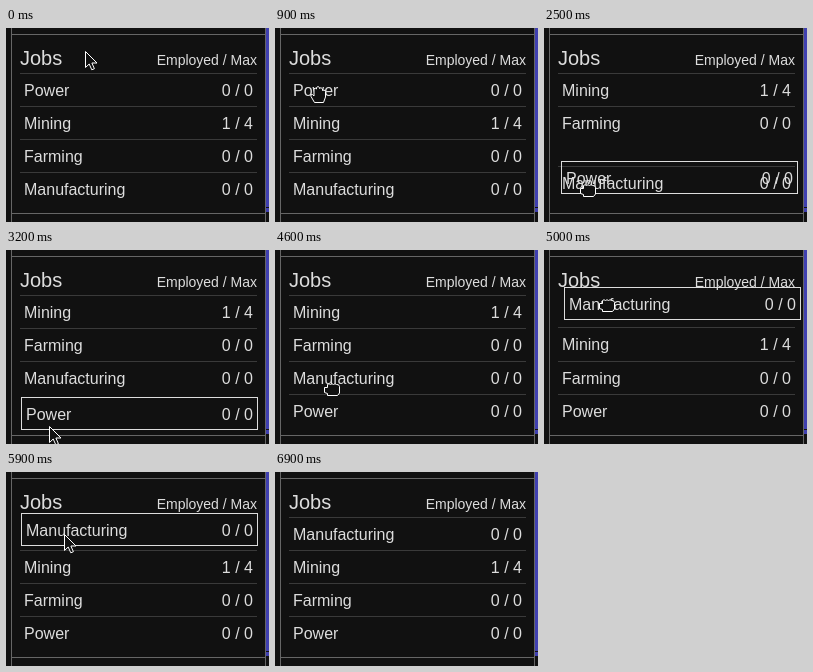
Recreate the animation shown at these times as an HTML page. Size 263 px wide and 194 px high, loop 7.4 s.

```html
<!DOCTYPE html>
<html lang="en">
<head>
<meta charset="utf-8">
<title>Jobs</title>
<style>
  html, body { margin: 0; width: 100%; height: 100%; overflow: hidden; background: #111; }
  body { position: relative; color: #ddd; font: 16px "Liberation Sans", Arial, sans-serif; }
  body > * { position: absolute; box-sizing: border-box; white-space: nowrap; }
  .frame { left: 5px; width: 255px; border: solid #666; border-width: 0 1px; top: 0; height: 194px; }
  .panel { left: 5px; width: 255px; border: solid #666; border-width: 1px 0; top: 6px; height: 180px; }
  .bar { left: 260px; top: 0; width: 3px; height: 184px; background: #4040b0; }
  .bar::after { content: ""; position: absolute; top: 179px; width: 3px; height: 1px; background: #111; }
  .head { left: 14px; top: 14px; width: 237px; height: 31px; }
  .head span { position: absolute; }
  .title { left: 0; top: 4px; font-size: 20px; line-height: 24px; }
  .note { right: 0; top: 10px; font-size: 14px; line-height: 16px; }
  .row {
    left: 0; top: 0; width: 237px; height: 33px; padding: 0 4px;
    display: flex; justify-content: space-between;
    line-height: 34px; border-top: 1px solid #3a3a3a;
  }
  .row.bare { border-top-color: transparent; }
  .row.held { border: 1px solid #ddd; z-index: 1; }
  svg { left: 0; top: 0; width: 24px; height: 28px; overflow: visible; z-index: 2; }
  svg path { fill: #111; stroke: #fff; stroke-width: 1; stroke-linejoin: round; }
</style>
</head>
<body>
<div class="frame"></div>
<div class="panel"></div>
<div class="bar"></div>
<div class="head"><span class="title">Jobs</span><span class="note">Employed / Max</span></div>
<svg id="cursor"><path/></svg>
<script>
const LOOP = 7400, TICK = 100, LEFT = 14, TOP = 45, ROW = 33, SLIDE = 150;
const LAG = 20;     // a held row trails the pointer
const STALE = 400;  // the pointer stays an arrow this long after release

// moves: [time, slot]; drag: start, drop, grip inside the row, final slot
const jobs = [
  { name: "Power", count: "0 / 0", moves: [],
    drag: { from: 1600, drop: 3300, dx: 28, dy: 29, slot: 3 } },
  { name: "Mining", count: "1 / 4", moves: [[1795, 0], [4895, 1]] },
  { name: "Farming", count: "0 / 0", moves: [[2170, 1], [4800, 2]] },
  { name: "Manufacturing", count: "0 / 0", moves: [[2490, 2]],
    drag: { from: 4700, drop: 6000, dx: 43, dy: 21, slot: 0 } }
];

// pointer glides: start, end, target x, target y, ease-out power
const home = [79, 23];
const glides = [
  [300, 900, 43, 66, 1],
  [1500, 2200, 48, 130, 1.2],
  [2200, 2900, 43, 176, 2.3],
  [3500, 3900, 57, 140, 1],
  [4650, 5200, 63.4, 48, 2.4],
  [5400, 5900, 58, 62, 2],
  [6200, 6400, 60, 64, 1],
  [6500, 6900, 47, -30, 1]
];

const shapes = {
  arrow: "M.5 .5V16.5L4.2 13 6.8 18.8 9.4 17.7 6.9 12H12Z",
  open: "M-3.5 8.5L-7 2.5Q-8 0-5.5 .5L-4 2V-5Q-3-7-1.5-5V-6.5Q0-8.5 1.5-6.5V-5.5Q3-7.5 4.5-5V-3.5Q6.5-5 7.5-2.5V3L5.5 8.5Z",
  closed: "M-4.5 5.5V3.5L-7.5 2.5V-2.5H-4.5V-5.5Q-3-7-1.5-5.5Q0-7 1.5-5.5Q3-7 4.5-5.5Q7-6 7.5-3.5V3L5.5 5.5Z"
};

const cursor = document.getElementById("cursor");
const glyph = cursor.firstElementChild;

jobs.forEach((job, i) => {
  job.slot = i;
  job.el = document.createElement("div");
  for (const text of [job.name, job.count]) {
    const span = document.createElement("span");
    span.textContent = text;
    job.el.append(span);
  }
  document.body.append(job.el);
});

function pointerAt(t) {
  let [x, y] = home;
  for (const [start, end, toX, toY, power] of glides) {
    if (t < start) break;
    const left = Math.max(0, 1 - (t - start) / (end - start)) ** power;
    x = toX + (x - toX) * left;
    y = toY + (y - toY) * left;
  }
  return [Math.round(x), Math.round(y)];
}

function slotAt({ slot, moves }, t) {
  for (const [start, to] of moves) {
    if (t < start) break;
    const left = Math.max(0, 1 - (t - start) / SLIDE);
    slot = to + (slot - to) * left ** 3;
  }
  return slot;
}

function lookAt(t, y) {
  for (const { drag } of jobs) {
    if (!drag) continue;
    const release = drag.drop - TICK;
    if (t >= drag.from - TICK && t < release) return "closed";
    if (t >= release && t < release + STALE) return "arrow";
  }
  return y >= TOP ? "open" : "arrow";
}

const place = (el, x, y) => { el.style.transform = `translate(${x}px, ${y}px)`; };

function draw(t) {
  const [x, y] = pointerAt(t);
  const [heldX, heldY] = pointerAt(t - LAG);
  place(cursor, x, y);
  glyph.setAttribute("d", shapes[lookAt(t, y)]);

  for (const job of jobs) {
    const d = job.drag;
    const dropped = d && t >= d.drop;
    const held = d && t >= d.from && !dropped;
    const bare = dropped && t < d.drop - TICK + STALE;
    job.el.className = "row" + (held ? " held" : bare ? " bare" : "");
    if (held) {
      place(job.el, heldX - d.dx, heldY - d.dy);
    } else {
      const slot = dropped ? d.slot : slotAt(job, t);
      place(job.el, LEFT, Math.round(TOP + slot * ROW));
    }
  }
}

const begin = performance.now();
function frame() {
  const t = (performance.now() - begin) % LOOP;
  draw(Math.floor(t / TICK) * TICK);
  requestAnimationFrame(frame);
}
draw(0);
requestAnimationFrame(frame);
</script>
</body>
</html>
```
